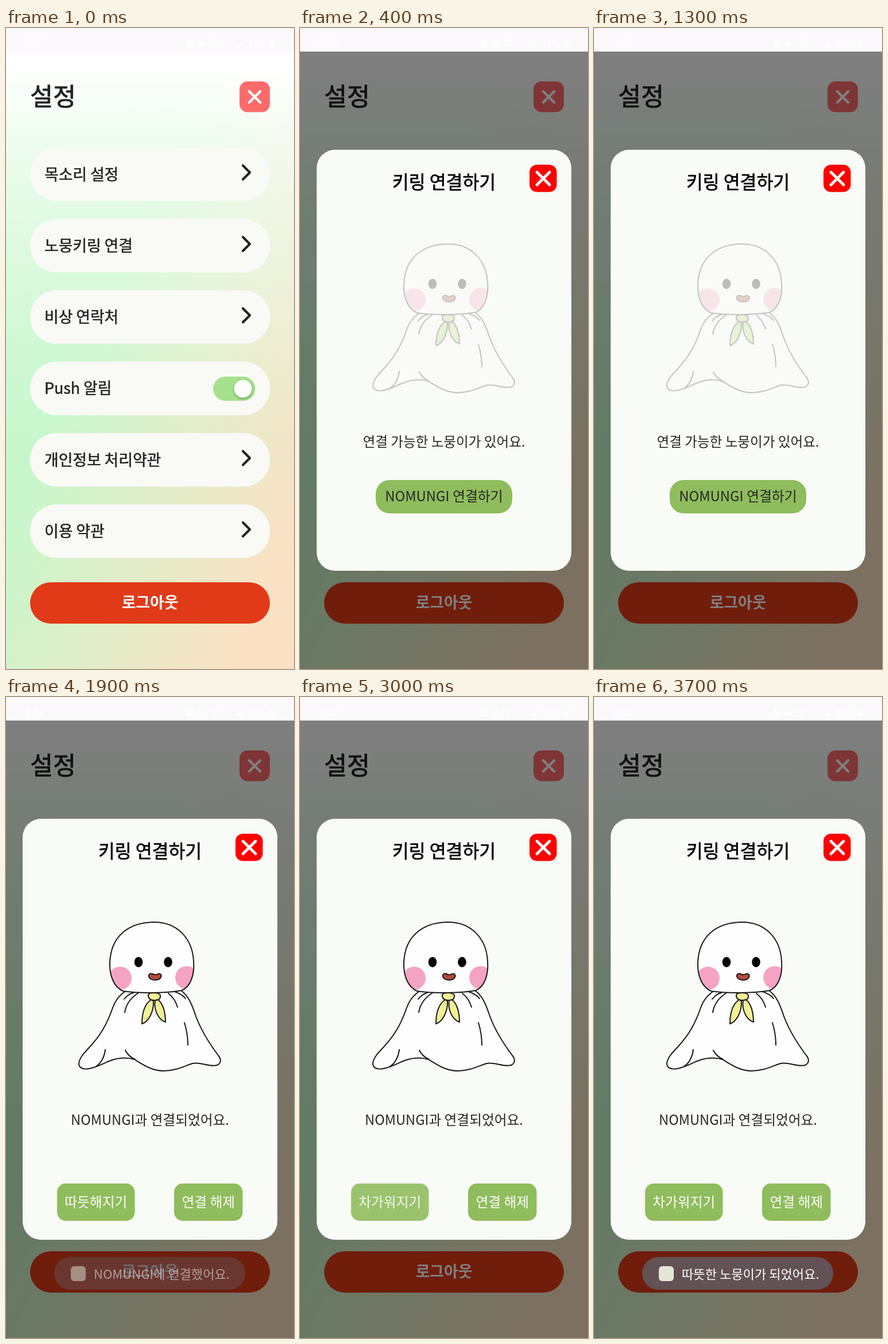
Write an HTML page with a canvas that moves like this. It is 502 px wide and 1116 px high and loops after 3.8 s.

```html
<!DOCTYPE html>
<html lang="ko">
<head>
<meta charset="utf-8">
<title>설정</title>
<style>
html, body { margin: 0; width: 100%; height: 100%; overflow: hidden; background: #fcf9fd; }
canvas { display: block; width: 100vw; height: 100vh; }
</style>
</head>
<body>
<canvas id="stage" width="502" height="1116"></canvas>
<script>
const W = 502, H = 1116, LOOP = 3800, STEP = 100, BAR = 41;
const OPEN = 400, LINKED = 1900, WARM = 3000, FADE = 200;
const FONT = '"Noto Sans CJK KR", "Noto Sans CJK", "Noto Sans", sans-serif';
const INK = '#222', SOFT = '#262626', PAPER = '#f9fbf6', GREEN = '#8fbc5c';
const ctx = document.getElementById('stage').getContext('2d');

const ramp = (t, from, span) => Math.min(1, Math.max(0, (t - from) / span));

function box(x, y, w, h, r, fill) {
  ctx.fillStyle = fill;
  ctx.beginPath();
  ctx.roundRect(x, y, w, h, r);
  ctx.fill();
}

// Weight 500 is a regular face with a hairline outline.
function text(str, x, cy, size, weight, color, align = 'left') {
  const y = cy + size * 0.37;
  ctx.font = `${weight === 500 ? 400 : weight} ${size}px ${FONT}`;
  ctx.textAlign = align;
  ctx.fillStyle = ctx.strokeStyle = color;
  ctx.fillText(str, x, y);
  if (weight !== 500) return;
  ctx.lineWidth = size * 0.02;
  ctx.strokeText(str, x, y);
}

function line(points, width, color) {
  ctx.strokeStyle = color;
  ctx.lineWidth = width;
  ctx.lineCap = ctx.lineJoin = 'round';
  ctx.beginPath();
  points.forEach(([x, y]) => ctx.lineTo(x, y));
  ctx.stroke();
}

function cross(cx, cy, r, width, color) {
  line([[cx - r, cy - r], [cx + r, cy + r]], width, color);
  line([[cx + r, cy - r], [cx - r, cy + r]], width, color);
}

function faded(alpha, draw) {
  if (alpha <= 0) return;
  ctx.save();
  ctx.globalAlpha = alpha;
  draw();
  ctx.restore();
}

function gradient(x0, y0, x1, y1, stops) {
  const g = ctx.createLinearGradient(x0, y0, x1, y1);
  stops.forEach(([at, color]) => g.addColorStop(at, color));
  return g;
}

const tint = gradient(60, 700, 502, 900, [[0, '#c6f7cb'], [0.5, '#e2edc9'], [1, '#fbe1c4']]);
const haze = gradient(0, 60, 0, 760, [
  [0, 'rgba(255,255,255,1)'], [0.17, 'rgba(255,255,255,.75)'],
  [0.36, 'rgba(255,255,255,.5)'], [0.75, 'rgba(255,255,255,.14)'], [1, 'rgba(255,255,255,0)']
]);
const barEdge = gradient(0, BAR, 0, 50, [[0, 'rgba(252,249,253,.6)'], [1, 'rgba(252,249,253,0)']]);

function statusBar() {
  ctx.fillStyle = '#fcf9fd';
  ctx.fillRect(0, 0, W, BAR);
  text('8:42', 33, 27, 17, 400, '#fff');
  box(314, 22, 11, 12, 3, '#fff');
  box(334, 23, 12, 9, 3, '#fff');
  line([[355, 24], [362, 21], [369, 24]], 2, '#fff');
  line([[359, 29], [362, 27], [365, 29]], 2, '#fff');
  [0, 1, 2, 3].forEach(i => box(401 + i * 3, 31 - i * 2, 2, 2 + i * 2, 0, '#fff'));
  text('38%', 421, 28, 16, 400, '#fff');
  box(459, 22, 9, 12, 2, '#fff');
}

const ITEMS = ['목소리 설정', '노뭉키링 연결', '비상 연락처', 'Push 알림', '개인정보 처리약관', '이용 약관'];

function toggle() {
  box(361, 607, 73.5, 42, 21, '#a6e18e');
  ctx.save();
  ctx.shadowColor = 'rgba(0,0,0,.3)';
  ctx.shadowBlur = 4;
  ctx.shadowOffsetY = 2;
  box(397.5, 612.5, 31, 31, 15.5, '#fff');
  ctx.restore();
}

function settings() {
  ctx.fillStyle = tint;
  ctx.fillRect(0, 0, W, H);
  ctx.fillStyle = haze;
  ctx.fillRect(0, 0, W, H);
  text('설정', 42, 119, 43.5, 500, INK);
  box(407, 93, 53, 53.5, 14, '#ff6b6b');
  cross(433.5, 120, 9.5, 4.5, '#fff');
  ITEMS.forEach((label, i) => {
    const cy = 254.6 + i * 124.3;
    box(42, cy - 46.5, 418, 93, 46, '#f9faf6');
    text(label, 67, cy, 26.8, 500, INK);
    if (i === 3) toggle();
    else line([[413, cy - 15], [425, cy - 3], [413, cy + 9]], 4.2, INK);
  });
  box(42, 965, 418, 72, 36, '#e13a18');
  text('로그아웃', 251, 1000, 26.8, 700, '#fff', 'center');
}

const HEAD = new Path2D('M204 512C188 505 180 485 181 462C183 415 215 393 256 392C298 391 325 420 327 460C329 485 321 505 306 511C280 516 230 516 204 512Z');
const CLOTH = new Path2D('M207 513C195 522 190 530 186 541C176 570 165 588 148 607C138 618 128 627 127 638C127 646 135 649 145 647C162 644 170 637 185 632C200 627 215 628 224 631C240 641 255 651 275 651C295 651 310 643 325 638C340 635 355 645 368 641C376 637 375 630 370 624C352 600 340 580 331 556C324 535 318 520 305 511');
const FOLDS = new Path2D('M173 614C172 625 166 638 157 643M208 615C211 622 217 627 225 631M231 515C217 524 209 536 207 549M222 515C214 517 210 521 206 526M283 516C291 522 296 530 299 540M294 513C303 516 309 520 313 525M311 567C315 580 317 592 317 606');
const TIE = new Path2D('M253 527C241 535 237 552 237 569C247 566 258 550 257 529ZM260 528C257 545 266 562 278 566C278 550 274 534 265 527ZM248 521C247 516 252 515 258 515C265 515 270 517 269 522C268 528 263 528 258 528C252 528 249 526 248 521Z');
const MOUTH = new Path2D('M249 487C248 482 252 481 255 482C259 484 262 484 265 482C269 481 272 484 270 488C267 494 252 495 249 487Z');

function makeDoll(tieColor) {
  const layer = document.createElement('canvas');
  layer.width = W;
  layer.height = H;
  const c = layer.getContext('2d');
  const dot = (x, y, rx, ry, color) => {
    c.fillStyle = color;
    c.beginPath();
    c.ellipse(x, y, rx, ry, 0, 0, Math.PI * 2);
    c.fill();
  };
  const shape = (path, fill) => {
    c.fillStyle = fill;
    c.fill(path);
    c.stroke(path);
  };
  c.strokeStyle = '#1a1a1a';
  c.lineWidth = 2;
  c.lineCap = c.lineJoin = 'round';
  shape(CLOTH, '#fefdff');
  c.stroke(FOLDS);
  c.fillStyle = '#fefdff';
  c.fill(HEAD);
  c.save();
  c.clip(HEAD);
  dot(199, 489.5, 20, 20, '#f4a3c3');
  dot(315, 488.5, 20, 20, '#f4a3c3');
  c.restore();
  c.stroke(HEAD);
  dot(231, 461.5, 7.3, 9, '#000');
  dot(282.5, 461.5, 7.3, 9, '#000');
  shape(MOUTH, '#b5483c');
  shape(TIE, tieColor);
  return layer;
}

const dolls = { idle: makeDoll('#b1d776'), linked: makeDoll('#f2ef96') };

function button(label, x, w, alpha = 1) {
  faded(alpha, () => {
    box(x, 847, w, 65, 15, GREEN);
    text(label, x + w / 2, 879.5, 23.7, 300, '#fff', 'center');
  });
}

function idlePanel() {
  faded(0.24, () => ctx.drawImage(dolls.idle, 0, -16));
  text('연결 가능한 노뭉이가 있어요.', 251, 720, 23.6, 300, SOFT, 'center');
  box(132, 787, 238, 58, 24, GREEN);
  text('NOMUNGI 연결하기', 251, 815.5, 23.9, 300, SOFT, 'center');
}

function linkedPanel(t) {
  ctx.drawImage(dolls.linked, 0, 0);
  text('NOMUNGI과 연결되었어요.', 251, 736.5, 23.7, 300, SOFT, 'center');
  if (t < WARM) button('따듯해지기', 89, 135.5);
  else button('차가워지기', 89, 135.5, 0.88 + 0.12 * ramp(t, WARM, STEP));
  button('연결 해제', 293, 119.5);
}

function modal(t) {
  ctx.fillStyle = 'rgba(0,0,0,.5)';
  ctx.fillRect(0, BAR, W, H - BAR);
  box(29, 212, 444, 733, 32, PAPER);
  text('키링 연결하기', 251, 268, 31.4, 500, '#000', 'center');
  box(400, 238, 47.5, 47.5, 13, '#f00');
  cross(424, 262, 11, 4.8, '#fff');
  if (t < LINKED) idlePanel();
  else linkedPanel(t);
}

function toast(label, alpha) {
  faded(alpha, () => {
    box(84, 975, 333, 57, 28.5, 'rgba(97,85,89,.95)');
    box(113, 991, 26, 26, 6, '#e2e6d6');
    text(label, 153, 1005, 22.1, 400, '#fff');
  });
}

function render(t) {
  settings();
  if (t >= OPEN) modal(t);
  else {
    ctx.fillStyle = barEdge;
    ctx.fillRect(0, BAR, W, 9);
  }
  toast('NOMUNGI에 연결했어요.', ramp(t, LINKED - FADE / 2, FADE) * (1 - ramp(t, WARM - FADE, FADE)));
  toast('따뜻한 노뭉이가 되었어요.', ramp(t, WARM, FADE));
  statusBar();
}

const start = performance.now();
function tick() {
  const t = (performance.now() - start) % LOOP;
  render(Math.floor(t / STEP) * STEP);
  requestAnimationFrame(tick);
}
tick();
</script>
</body>
</html>
```
